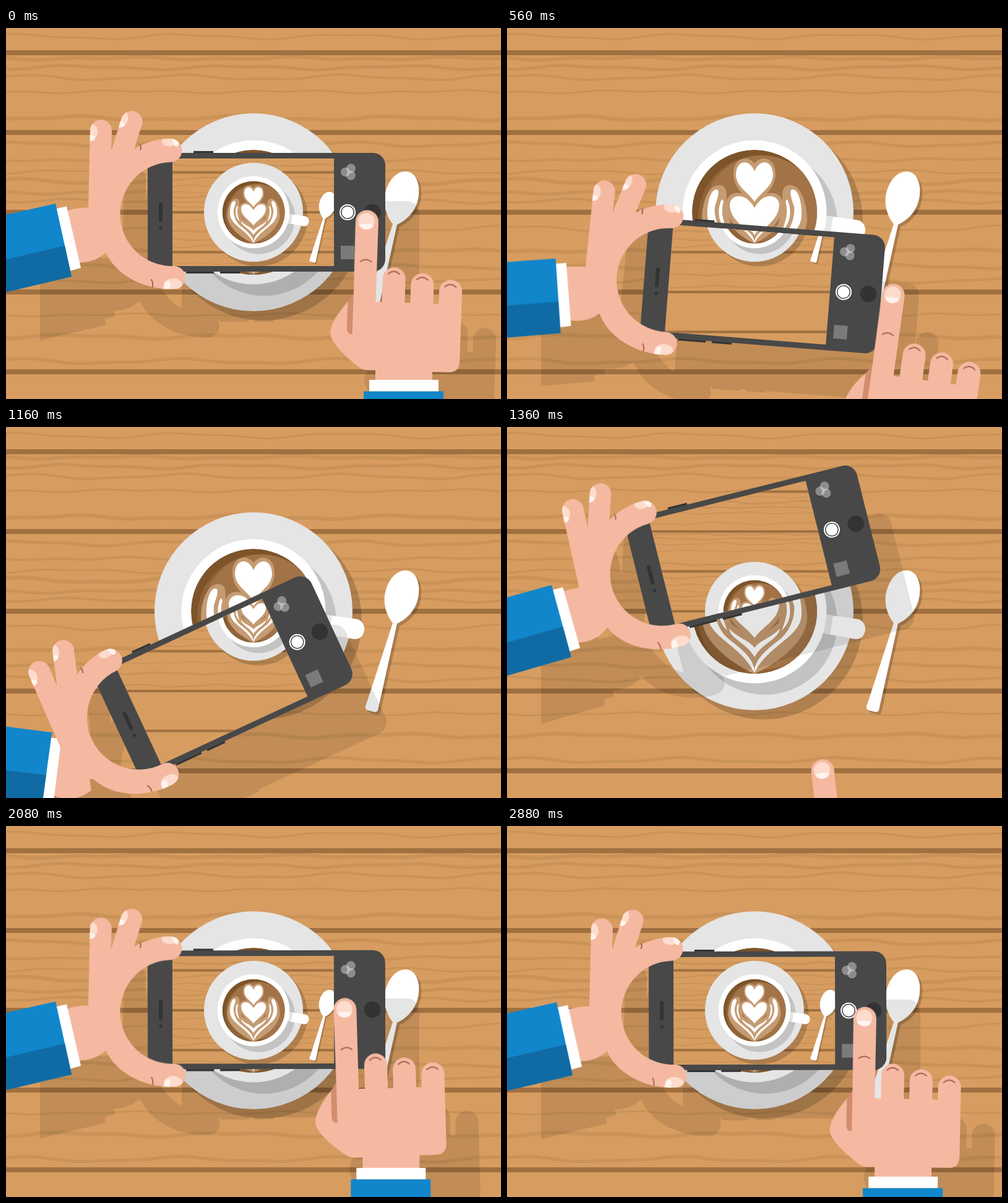
Write an HTML page that moves like this. It is 800 px wide and 600 px high and loops after 2920 ms.

```html
<!DOCTYPE html>
<html lang="en">
<head>
<meta charset="utf-8">
<title>Coffee photo</title>
<style>
html, body { margin: 0; height: 100%; overflow: hidden; background: #d79c60; }
svg { display: block; width: 100vw; height: 100vh; }
.skin { fill: #f5b9a2; }
.nail { fill: #fddccd; }
.tip { fill: #fff4ee; }
.crease { fill: none; stroke: #a9634f; stroke-width: 2; stroke-linecap: round; }
.tan { fill: #c59b72; }
.milk { fill: #fff; }
.dark { fill: #333; }
</style>
</head>
<body>
<svg viewBox="0 0 800 600">
  <defs>
    <filter id="drop" filterUnits="userSpaceOnUse" x="-600" y="-200" width="2000" height="1400" color-interpolation-filters="sRGB">
      <feDropShadow dx="55" dy="78" stdDeviation="0" flood-color="#000" flood-opacity=".1"/>
    </filter>
    <clipPath id="screenClip"><rect class="phone" x="269" y="211" width="261" height="174"/></clipPath>
    <clipPath id="coffeeClip"><circle cx="400" cy="298" r="101"/></clipPath>
    <clipPath id="handClip"><use href="#leftHand"/></clipPath>

    <path id="leftHand" d="M133 292 L136 166 A17.5 17.5 0 0 1 171 166 L170 199 L187 145 A17.5 17.5 0 0 1 220.500 154 L207 196
      C225 185 245 179 265 179 A19 19 0 0 1 266 217 A84 84 0 0 0 271 385 A18.500 18.500 0 0 1 272 422 C230 424 180 405 160 361 C140 350 132 320 133 292Z"/>
    <path id="spoon" d="M645 232 C662 232 669 250 667 270 C664 298 645 312 632 318 L601 458 Q600 461 596 461 L584 458 Q580 456 581 452 L625 317 C615 305 610 288 612 272 C616 248 630 232 645 232Z"/>
    <path id="handle" d="M512 303 L566 310.500 C575 312 580 320 579 329 C577 338 572 344 562 343 L508 333Z"/>
    <g id="leaf">
      <path class="tan" d="M400 399 C372 387 317 352 315 310 C315 285 324 254 343 254 C356 254 356 268 354 288 L362 318 L400 344Z"/>
      <path class="milk" d="M339 261 C328 261 323 285 324 305 C327 340 376 352 400 397 C400 372 374 356 356 341 C340 326 334 302 336 289 C340 276 345 263 339 261Z"/>
      <path class="milk" d="M347 277 C339 294 341 316 356 329 C349 311 345 298 350 280Z"/>
      <path class="milk" d="M359 326 C361 343 386 348 400 372 L400 357 C390 344 374 342 359 326Z"/>
    </g>

    <g id="scene">
      <rect x="-500" y="-700" width="1800" height="2000" fill="#d79c60"/>
      <g id="grain" fill="none" stroke="#c99358"></g>
      <g id="planks" fill="#a07040"></g>
      <g opacity=".18">
        <circle cx="415" cy="313" r="160"/>
      </g>
      <use href="#spoon" x="4" y="4" opacity=".2"/>
      <use href="#spoon" fill="#fff"/>
      <circle cx="400" cy="298" r="160" fill="#e5e5e5"/>
      <circle cx="417" cy="316" r="117" fill="#c3c3c3"/>
      <use href="#handle" fill="#fff"/>
      <path d="M512 303 L527 305 L522 335.500 L508 333Z" fill="#e5e5e5"/>
      <circle cx="400" cy="298" r="116.500" fill="#fff"/>
      <g clip-path="url(#coffeeClip)">
        <circle cx="400" cy="298" r="101" fill="#7d5429"/>
        <circle cx="410" cy="307" r="101" fill="#8f6438"/>
        <circle cx="412" cy="299" r="93" fill="#a27347"/>
        <use href="#leaf"/>
        <use href="#leaf" transform="matrix(-1 0 0 1 800 0)"/>
        <path class="tan" d="M400 350 C380 328 354 315 354 286 C354 266 376 258 400 280 C424 258 446 266 446 286 C446 315 420 328 400 350Z"/>
        <path class="milk" d="M400 341 C386 322 361 312 360 286 C361 267 388 266 400 291 C412 266 439 267 440 286 C439 312 414 322 400 341Z"/>
        <path class="tan" d="M400 290 C389 273 366 262 366 236 C366 210 388 205 400 219 C412 205 434 210 434 236 C434 262 411 273 400 290Z"/>
        <path class="milk" d="M400 281 C390 266 371 257 370 238 C370 213 392 210 400 232 C408 210 430 213 430 238 C429 257 410 266 400 281Z"/>
      </g>
    </g>
  </defs>

  <use href="#scene"/>
  <g filter="url(#drop)">
    <g class="phone">
      <path class="dark" d="M303 199h32v5h-32z M291 392h16v5h-16z M303 392h33v5h-33z M346 392h32v5h-32z"/>
      <rect x="229" y="202" width="384" height="192" rx="20" fill="#484848"/>
      <rect class="dark" x="247" y="282" width="6" height="32" rx="3"/>
      <circle class="dark" cx="250" cy="324" r="2.7"/>
      <circle class="dark" cx="592" cy="298" r="13.300"/>
      <circle cx="552" cy="298" r="12" fill="none" stroke="#fff" stroke-width="2"/>
      <circle cx="552" cy="298" r="9.500" fill="#fff"/>
      <g fill="#fff" fill-opacity=".38">
        <circle cx="557.500" cy="227" r="7.500"/><circle cx="548.500" cy="233" r="7.500"/><circle cx="557.500" cy="238.500" r="7.500"/>
      </g>
      <rect x="541" y="352" width="22" height="22" fill="#7b7b7b"/>
    </g>
    <g clip-path="url(#screenClip)">
      <use href="#scene" transform="translate(200 149) scale(.5)"/>
      <path id="focus" d="M372 271h55v55h-55z M399.500 271v9 M399.500 326v-9 M372 298h9 M427 298h-9" fill="none" stroke="#f2e36f" stroke-width="2"/>
    </g>
    <g id="arm">
      <path class="skin" d="M96 296 C112 291 125 290 140 291 L172 350 C158 372 138 380 114 379Z"/>
      <path fill="#fff" d="M80 292.500 L98 288.500 L121 388 L103 393Z"/>
      <path fill="#1186cb" d="M-500 415 L80 284 L106 402 L-500 545Z"/>
      <path fill="#106ba4" d="M-500 492 L95 352 L106 402 L-500 545Z"/>
    </g>
    <g class="phone">
      <use href="#leftHand" class="skin"/>
      <g clip-path="url(#handClip)">
        <ellipse class="nail" cx="137" cy="168" rx="11" ry="13"/>
        <ellipse class="tip" cx="136" cy="178" rx="8" ry="5"/>
        <ellipse class="nail" cx="188" cy="147" rx="9" ry="13" transform="rotate(15 188 147)"/>
        <ellipse class="tip" cx="184" cy="156" rx="8" ry="5"/>
        <ellipse class="nail" cx="264" cy="183" rx="12" ry="8.500"/>
        <ellipse class="tip" cx="274" cy="184" rx="4.500" ry="8" transform="rotate(-20 274 184)"/>
        <ellipse class="nail" cx="270" cy="415" rx="15" ry="10"/>
        <ellipse class="tip" cx="260" cy="418" rx="5" ry="9" transform="rotate(20 260 418)"/>
      </g>
      <path class="crease" d="M217 189q2 4 0 8 M235 407q3 5 2 11"/>
    </g>
    <g id="cuff">
      <rect class="skin" x="586" y="522" width="92" height="36"/>
      <rect x="567" y="573.500" width="129" height="500" fill="#1186cb"/>
      <rect x="576" y="555" width="112" height="18.500" fill="#fff"/>
    </g>
    <g id="rightHand">
      <path class="skin" d="M546 299 a18.500 18.500 0 0 1 37 0 V428 H593 V390 a18.500 18.500 0 0 1 37 0 V428 H639 V398 a18.500 18.500 0 0 1 37 0 V428
        H685 V407 a18.500 18.500 0 0 1 37 0 V520 Q722 538 704 538 L574 539 Q565 539 557 533 C538 518 515 500 511.500 482 C511 464 528 440 547 420Z"/>
      <path fill="#d18d6c" d="M547 416 V482 Q538 482 538 472 V431 Q541 425 547 416Z"/>
      <circle class="nail" cx="563.500" cy="298" r="13"/>
      <path class="tip" d="M551.500 304 Q563.500 301 575.500 304 A13 13 0 0 1 551.500 304Z"/>
      <path class="crease" d="M556 364q9 -7 18 0 M602 382q9 -8 18 0 M648 390q9 -8 18 0 M694 400q9 -8 18 0"/>
    </g>
  </g>
</svg>
<script>
const LOOP = 2920, STEP = 40, RAD = Math.PI / 180;
const $ = id => document.getElementById(id);

// Shutter button: time, x, y, angle
const phoneKeys = [
  [0, 552, 298, 0], [360, 548, 282, 3], [400, 547, 281, 3.4], [480, 546, 327, 4], [560, 544, 427, 4.5], [640, 542, 585, 5], [720, 540, 800, 5],
  [1000, 440, 720, -30], [1120, 458, 430, -27], [1240, 500, 212, -20], [1320, 518, 164, -16], [1360, 525, 166, -14], [1440, 538, 206, -8],
  [1560, 552, 294, 0], [1640, 555, 316, 2.4], [1760, 554, 317, 2.2], [1920, 552, 302, 0.6], [2040, 552, 297, -0.1], [2160, 552, 298, 0]
];
// Right index fingertip: time, x, y, angle
const tipKeys = [
  [0, 582, 311, 2], [120, 592, 317, 3.7], [360, 603, 329, 5.7], [460, 612, 360, 6.8], [560, 623, 430, 8], [640, 628, 530, 8], [720, 630, 690, 8],
  [1000, 508, 900, -6], [1200, 508, 720, -6], [1360, 508.5, 554, -6], [1560, 505, 375, -6.2], [1760, 509, 315, -5.7], [1940, 527, 301, -3.5],
  [2120, 551, 294, -1.2], [2280, 562, 296, 0], [2440, 563, 297, 0], [2680, 564, 298, 0.1], [2880, 577, 309, 1.2]
];

// Periodic cubic interpolation through the keys
function sample(keys, t) {
  const n = keys.length;
  const at = (i, c) => keys[(i + n) % n][c] + (c ? 0 : LOOP * Math.floor(i / n));
  let i = n - 1;
  while (keys[i][0] > t) i--;
  const span = at(i + 1, 0) - at(i, 0), u = (t - at(i, 0)) / span;
  const slope = (j, c) => (at(j + 1, c) - at(j - 1, c)) / (at(j + 1, 0) - at(j - 1, 0)) * span;
  return [1, 2, 3].map(c => {
    const a = at(i, c), b = at(i + 1, c), p = slope(i, c), q = slope(i + 1, c);
    return a + u * (p + u * (3 * (b - a) - 2 * p - q + u * (2 * (a - b) + p + q)));
  });
}

// Puts the rest point (px, py) at (x, y), turned by angle
const place = (el, x, y, angle, px, py) =>
  el.setAttribute('transform', `translate(${x} ${y}) rotate(${angle}) translate(${-px} ${-py})`);

function buildWood() {
  const rows = [-230, -190, -150, -122, -72, -54, -38, -20, 14, 49, 64, 80, 103, 146, 188, 213, 233, 248, 266, 280, 324, 360, 386, 408, 464, 499, 539];
  let grain = '', planks = '';
  rows.forEach((y, i) => {
    let d = '';
    for (let x = -100; x <= 900; x += 10) {
      const wave = (1.5 + i % 3) * Math.sin(x / 42 + i * 2.1) + 1.3 * Math.sin(x / 19 + i * 1.3);
      d += (d ? 'L' : 'M') + x + ' ' + (y + wave).toFixed(1);
    }
    grain += `<path d="${d}" stroke-width="${3 + i * 3 % 4}"/>`;
  });
  for (let y = -605; y < 1200; y += 129) planks += `<rect x="-500" y="${y - 4}" width="1800" height="8"/>`;
  $('grain').innerHTML = grain;
  $('planks').innerHTML = planks;
}

const phoneParts = document.querySelectorAll('.phone');

function draw(t) {
  const [x, y, a] = sample(phoneKeys, t);
  phoneParts.forEach(el => place(el, x, y, a, 552, 298));

  // The forearm hangs on the wrist and swings with its height
  const c = Math.cos(a * RAD), s = Math.sin(a * RAD);
  const wx = x - 422 * c - 37 * s, wy = y - 422 * s + 37 * c;
  place($('arm'), wx, wy, (wy - 335) * 0.09, 130, 335);

  const [tx, ty, ta] = sample(tipKeys, t);
  place($('rightHand'), tx, ty, ta, 563, 297);
  place($('cuff'), (tx - 563) * 0.58, ty - 297, 0, 0, 0);

  $('focus').style.display = t >= 2280 && t < 2600 ? '' : 'none';
}

buildWood();
const start = performance.now();
function tick() {
  const t = (performance.now() - start) % LOOP;
  draw(Math.floor(t / STEP) * STEP);
  requestAnimationFrame(tick);
}
tick();
</script>
</body>
</html>
```
